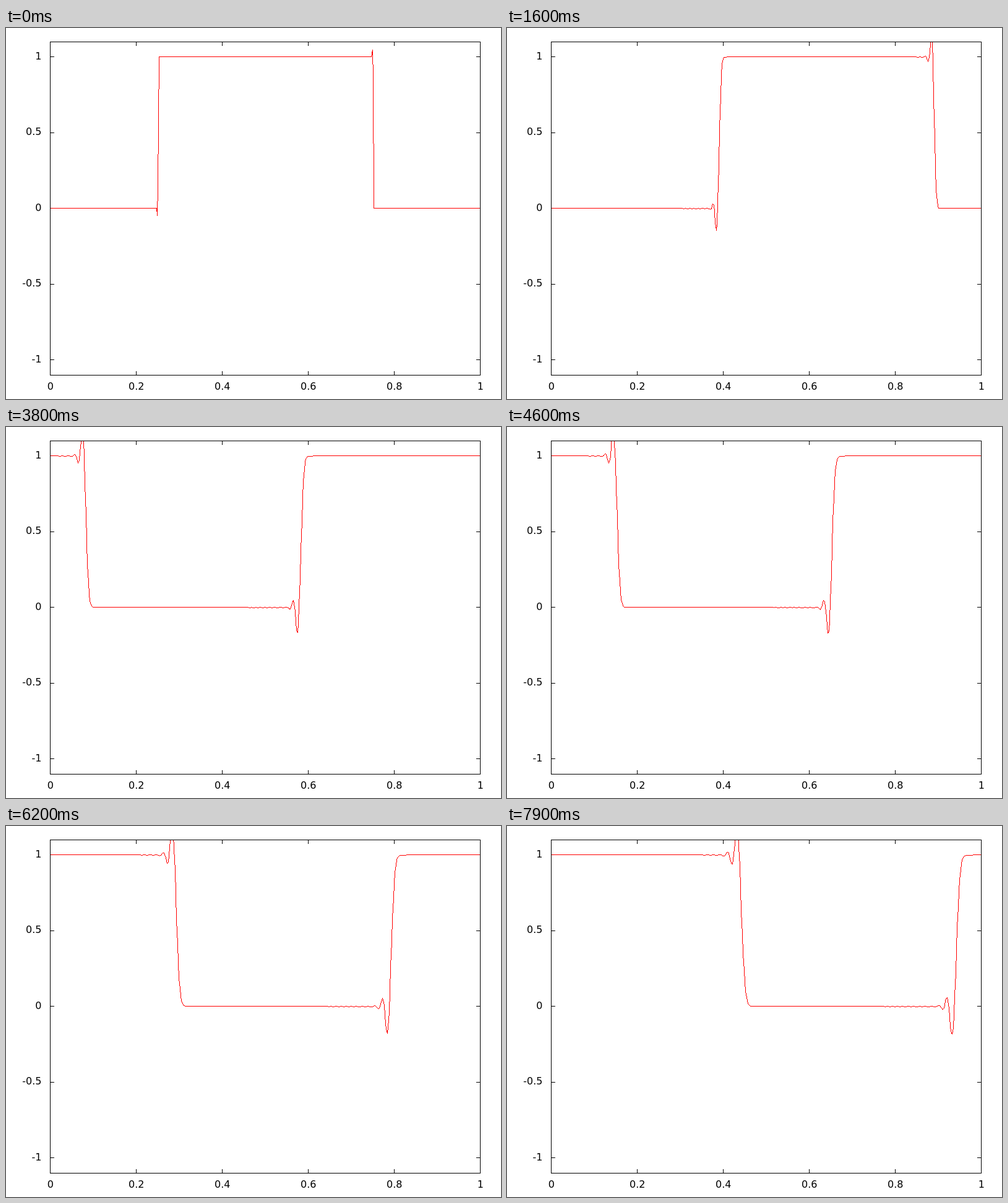
Write an HTML page with a canvas that moves like this. It is 800 px wide and 600 px high and loops after 8 s.

```html
<!DOCTYPE html>
<html>
<head>
<meta charset="utf-8">
<style>
html, body { margin: 0; width: 100%; height: 100%; overflow: hidden; background: #fff; }
canvas { display: block; }
</style>
</head>
<body>
<canvas id="stage" width="800" height="600"></canvas>
<script>
const ctx = document.getElementById('stage').getContext('2d');

const LEFT = 71, RIGHT = 766, TOP = 22, BOTTOM = 561;
const CELLS = 512, COURANT = 0.9, STEPS = 5, FRAMES = 80, FRAME_MS = 100;

const px = x => Math.round(LEFT + x * (RIGHT - LEFT));
const py = y => Math.ceil(291 - 245 * y);

// One Lax-Wendroff step of the advection equation, periodic in x.
function advance(u) {
  return u.map((mid, j) => {
    const prev = u[(j + CELLS - 1) % CELLS];
    const next = u[(j + 1) % CELLS];
    return mid - COURANT / 2 * (next - prev)
      + COURANT * COURANT / 2 * (next - 2 * mid + prev);
  });
}

// Square pulse, first shown after one step, then every few steps.
function simulate() {
  let u = Array.from({ length: CELLS }, (_, j) => {
    const x = (j + 0.5) / CELLS;
    return x > 0.25 && x < 0.75 ? 1 : 0;
  });
  u = advance(u);
  const curves = [];
  for (let i = 0; i < FRAMES; i++) {
    curves.push(u.map((v, j) => [
      px((j + 0.5) / CELLS),
      py(Number(v.toPrecision(6)))
    ]));
    for (let s = 0; s < STEPS; s++) u = advance(u);
  }
  return curves;
}

function dot(x, y) {
  if (y > TOP && y < BOTTOM) ctx.fillRect(x, y, 1, 1);
}

// Hard-edged line, one pixel wide.
function line(a, b) {
  const dx = Math.abs(b[0] - a[0]), dy = Math.abs(b[1] - a[1]);
  const main = dy > dx ? 1 : 0, side = 1 - main;
  if (a[main] > b[main]) [a, b] = [b, a];
  const len = Math.max(dx, dy), rise = Math.min(dx, dy);
  const dir = Math.sign(b[side] - a[side]);
  for (let k = 0; k <= len; k++) {
    const off = len ? dir * Math.floor((2 * rise * k + len) / (2 * len)) : 0;
    if (main) dot(a[0] + off, a[1] + k);
    else dot(a[0] + k, a[1] + off);
  }
}

function drawAxes() {
  ctx.fillStyle = '#fff';
  ctx.fillRect(0, 0, 800, 600);
  ctx.fillStyle = '#000';
  const w = RIGHT - LEFT + 1, h = BOTTOM - TOP + 1;
  ctx.fillRect(LEFT, TOP, w, 1);
  ctx.fillRect(LEFT, BOTTOM, w, 1);
  ctx.fillRect(LEFT, TOP, 1, h);
  ctx.fillRect(RIGHT, TOP, 1, h);

  ctx.font = '16px "DejaVu Sans", sans-serif';
  ctx.textBaseline = 'alphabetic';
  ctx.textAlign = 'center';
  for (const v of [0, 0.2, 0.4, 0.6, 0.8, 1]) {
    const x = px(v);
    ctx.fillRect(x, TOP, 1, 7);
    ctx.fillRect(x, BOTTOM - 6, 1, 7);
    ctx.fillText(String(v), x + 0.75, 585);
  }
  ctx.textAlign = 'right';
  for (const v of [-1, -0.5, 0, 0.5, 1]) {
    const y = py(v);
    ctx.fillRect(LEFT, y, 7, 1);
    ctx.fillRect(RIGHT - 6, y, 7, 1);
    ctx.fillText(String(v), 57.5, Math.floor(291 - 245 * v) + 5);
  }
}

const curves = simulate();
let shown = -1;

function tick() {
  const i = Math.floor(performance.now() / FRAME_MS) % FRAMES;
  if (i !== shown) {
    shown = i;
    drawAxes();
    ctx.fillStyle = '#f00';
    const pts = curves[i];
    for (let j = 1; j < CELLS; j++) line(pts[j - 1], pts[j]);
  }
  requestAnimationFrame(tick);
}
tick();
</script>
</body>
</html>
```
